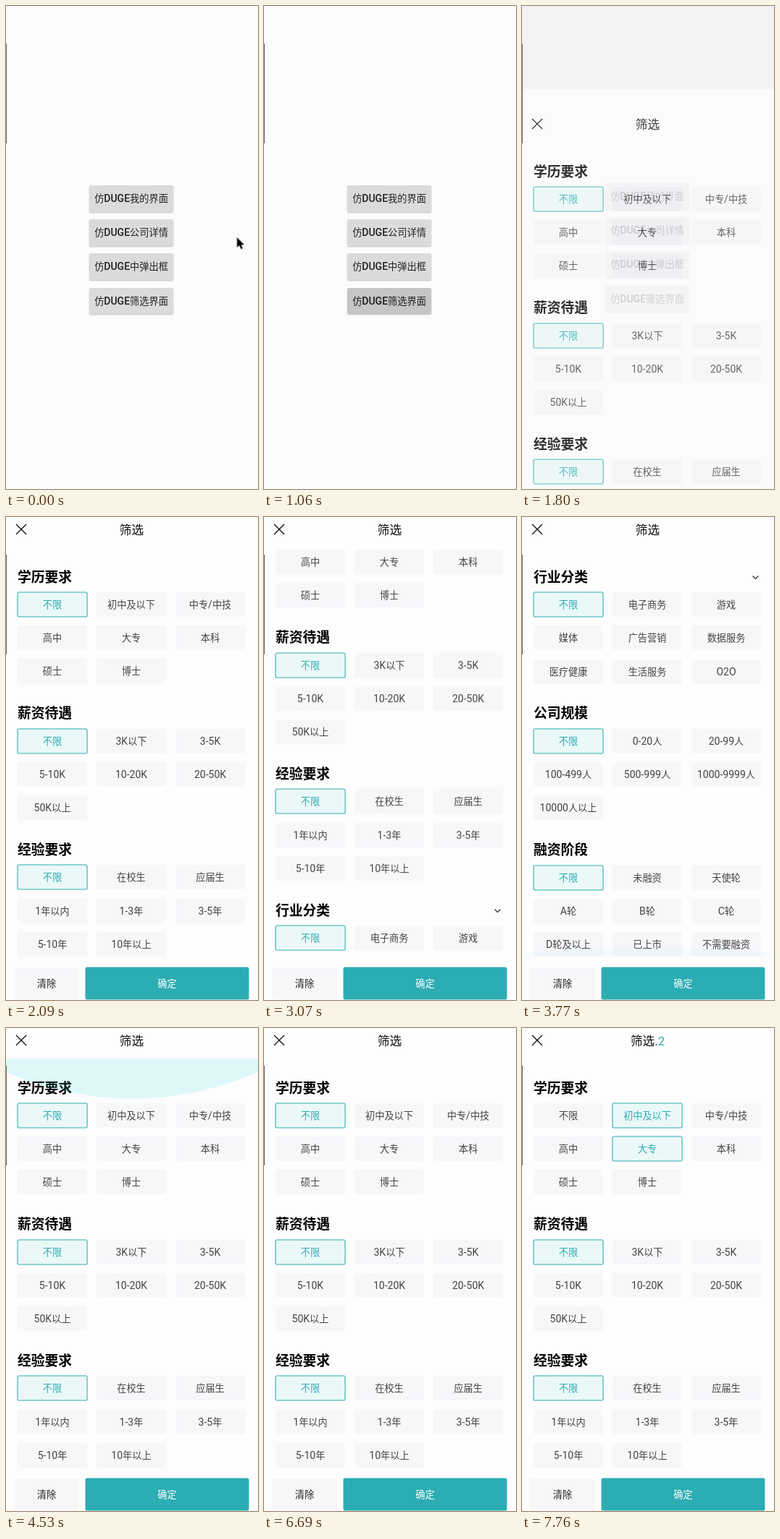
Recreate the animation shown at these times as an HTML page. Size 348 by 668 pixels, loop 8000 ms.

```html
<!DOCTYPE html>
<html lang="zh-CN">
<head>
<meta charset="utf-8">
<title>筛选</title>
<style>
:root { --teal: #2cadb3; --chip: #f7f6f9; --page: #fdfdfd; }
* { box-sizing: border-box; }
html, body { margin: 0; width: 100%; height: 100%; overflow: hidden; background: #fdfbfe; }
body { position: relative; font: 13.2px Roboto, "Noto Sans CJK SC", "Noto Sans CJK", sans-serif; color: #444; white-space: nowrap; }
div, svg, .on { position: absolute; }
.lat { font-size: 14px; }
.stage { inset: 0; width: 348px; height: 668px; overflow: hidden; }
.stage *, .ripple::after { animation: 8s linear infinite; }

/* Start page */
.home, .scrim { inset: 0; }
.home { animation-name: homeUp; }
.btn { left: 115px; width: 116px; height: 36.5px; line-height: 37px; border-radius: 2px; overflow: hidden;
  text-align: center; color: #222; background: #dbdadc; }
.shade { left: 115px; width: 116px; height: 36.5px; border-radius: 2px; box-shadow: 0 1px 2px rgba(0,0,0,.25); }
.btn .lat { font-weight: 500; }
.ripple::after { content: ""; position: absolute; left: -12px; top: -52px; width: 140px; height: 140px; border-radius: 50%;
  background: #000; opacity: 0; animation-name: ripple; }
.scrim { background: #000; opacity: 0; animation-name: scrim; }
.cursor { left: 0; top: 0; overflow: visible; animation-name: cursor; }

/* Filter page */
.sheet { left: 0; top: -31px; width: 348px; height: 699px; border-top: 31px solid var(--page); background: var(--page); animation-name: sheet; }
.title { left: 0; top: 6px; width: 347px; line-height: 25px; font-size: 16.7px; text-align: center; color: #111; }
.title b { font-weight: 400; color: var(--teal); }
.view { left: 0; top: 42px; width: 348px; height: 566px; overflow: hidden; }
.list { left: 0; top: 0; width: 348px; animation-name: scroll; }
.head { left: 16px; line-height: 24px; font-size: 18.8px; font-weight: 700; color: #000; }
.cell { width: 96px; height: 34px; line-height: 34px; text-align: center; border-radius: 2px; background: var(--chip); }
/* Keeps one baseline for lines with and without Latin text */
.cell::before, .on::before, .act::before { content: "\200b"; font-size: 14px; }
.on { inset: 0; border-radius: 2px; background: #ebf8f8; color: var(--teal);
  box-shadow: 0 0 0 .6px var(--teal), inset 0 0 0 .5px var(--teal); }
.step { animation-timing-function: step-end !important; }
.glow { left: 0; width: 348px; height: 56px; overflow: hidden; opacity: 0; }
.glow::before { content: ""; position: absolute; left: -253px; width: 854px; height: 854px; border-radius: 50%; background: rgba(22,214,230,.13); }
.glow.up { top: 0; transform-origin: top; animation-name: glowUp; }
.glow.up::before { bottom: 0; }
.glow.down { bottom: 0; transform-origin: bottom; animation-name: glowDown; }
.glow.down::before { top: 0; }
.act { line-height: 44px; height: 44px; top: 623px; text-align: center; border-radius: 2px; }
.clear { left: 11px; width: 90px; background: var(--chip); color: #222; }
.ok { left: 110px; width: 225px; background: var(--teal); color: #fff; box-shadow: 0 0 0 .5px var(--teal); }
.edge { left: 0; top: 52px; width: 1px; height: 138px; background: #666; }

@keyframes cursor {
  0%, .75% { transform: translate(318.5px, 319.5px); animation-timing-function: ease-in-out; }
  8.125%, 100% { transform: translate(-16px, 570px); }
}
@keyframes ripple {
  0%, 10.3% { transform: scale(0); opacity: .1; }
  13.2% { transform: scale(1); opacity: .1; }
  17.25%, 100% { transform: scale(1); opacity: 0; }
}
@keyframes homeUp {
  0%, 22.2% { transform: none; }
  22.5% { transform: translateY(-3px); }
  26.125%, 100% { transform: translateY(-13px); }
}
@keyframes scrim {
  0%, 22.49% { opacity: 0; }
  22.5% { opacity: .035; }
  26.125%, 100% { opacity: .1; }
}
@keyframes sheet {
  0%, 22.49% { opacity: 0; transform: translateY(148px); }
  22.5% { opacity: .8; transform: translateY(148px); animation-timing-function: cubic-bezier(.15,.6,.3,1); }
  26.125%, 100% { opacity: 1; transform: none; }
}
@keyframes scroll {
  0%, 35.625% { transform: none; }
  36.375% { transform: translateY(-12px); }
  38.375% { transform: translateY(-104px); }
  40% { transform: translateY(-225px); }
  41.875% { transform: translateY(-390px); }
  44.125%, 52.25% { transform: translateY(-566px); }
  53% { transform: translateY(-530px); }
  53.75% { transform: translateY(-400px); }
  55.875%, 100% { transform: none; }
}
@keyframes glowDown {
  0%, 44% { opacity: 0; transform: scaleY(0); }
  45% { opacity: .9; transform: scaleY(.8); }
  47.125%, 52.9% { opacity: .3; transform: scaleY(.23); }
  53%, 100% { opacity: 0; transform: scaleY(0); }
}
@keyframes glowUp {
  0%, 55.8% { opacity: 0; transform: scaleY(0); }
  56.625% { opacity: 1; transform: none; }
  59.625%, 100% { opacity: 0; transform: scaleY(.1); }
}
/* Selections, as visibility over time */
@keyframes any { 0% { opacity: 1 } 66.125% { opacity: 0 } 83.625% { opacity: 1 } 90.25%, 100% { opacity: 0 } }
@keyframes junior { 0% { opacity: 0 } 66.125% { opacity: 1 } 83.625% { opacity: 0 } 90.25%, 100% { opacity: 1 } }
@keyframes college { 0% { opacity: 0 } 72.875% { opacity: 1 } 83.625% { opacity: 0 } 97%, 100% { opacity: 1 } }
@keyframes doctor { 0% { opacity: 0 } 76.875% { opacity: 1 } 83.625%, 100% { opacity: 0 } }
@keyframes one { 0% { opacity: 0 } 66.125% { opacity: 1 } 72.875% { opacity: 0 } 90.25% { opacity: 1 } 97%, 100% { opacity: 0 } }
@keyframes two { 0% { opacity: 0 } 72.875% { opacity: 1 } 76.875% { opacity: 0 } 97%, 100% { opacity: 1 } }
</style>
</head>
<body>
<div class="stage">
  <div class="home" id="home"></div>
  <svg class="cursor" width="12" height="18">
    <path d="M.5 .5V14.5L3.8 11.5 6 16.8 8.4 15.8 6.2 10.7H10.6Z" fill="#000" stroke="#fff" stroke-width="1" paint-order="stroke"/>
  </svg>
  <div class="scrim"></div>
  <div class="sheet">
    <svg width="40" height="34" style="left:0;top:0"><path d="M14 10L28 24M28 10L14 24" stroke="#111" stroke-width="1.4"/></svg>
    <div class="title step" style="animation-name:any">筛选</div>
    <div class="title step" style="animation-name:one">筛选.<b>1</b></div>
    <div class="title step" style="animation-name:two">筛选.<b>2</b></div>
    <div class="title step" style="animation-name:doctor">筛选.<b>3</b></div>
    <div class="view">
      <div class="list" id="list"></div>
      <div class="glow up"></div>
      <div class="glow down"></div>
    </div>
    <div class="act clear">清除</div>
    <div class="act ok">确定</div>
  </div>
  <div class="edge"></div>
</div>
<script>
const buttons = ['我的界面', '公司详情', '中弹出框', '筛选界面'];
const sections = [
  '学历要求 不限 初中及以下 中专/中技 高中 大专 本科 硕士 博士',
  '薪资待遇 不限 3K以下 3-5K 5-10K 10-20K 20-50K 50K以上',
  '经验要求 不限 在校生 应届生 1年以内 1-3年 3-5年 5-10年 10年以上',
  '行业分类 不限 电子商务 游戏 媒体 广告营销 数据服务 医疗健康 生活服务 O2O',
  '公司规模 不限 0-20人 20-99人 100-499人 500-999人 1000-9999人 10000人以上',
  '融资阶段 不限 未融资 天使轮 A轮 B轮 C轮 D轮及以上 已上市 不需要融资'
];
const toggles = { 0: 'any', 1: 'junior', 4: 'college', 7: 'doctor' };

const latin = s => s.replace(/[A-Za-z0-9\/-]+/g, '<span class="lat">$&</span>');

home.innerHTML = buttons.map((name, i) => {
  const top = `style="top:${248 + i * 47.2}px"`;
  return `<div class="shade" ${top}></div><div class="btn${i === 3 ? ' ripple' : ''}" ${top}>${latin('仿DUGE' + name)}</div>`;
}).join('');

function cell(text, i, section) {
  const x = 16 + i % 3 * 109, y = section * 188.7 + 62 + Math.floor(i / 3) * 46.2;
  const anim = section === 0 && toggles[i];
  const on = anim || i === 0
    ? `<span class="on step" style="animation-name:${anim || 'none'}">${latin(text)}</span>` : '';
  return `<div class="cell" style="left:${x}px;top:${y}px">${latin(text)}${on}</div>`;
}

list.innerHTML = sections.map((line, s) => {
  const [head, ...items] = line.split(' ');
  return `<div class="head" style="top:${s * 188.7 + 29.5}px">${head}</div>` + items.map((t, i) => cell(t, i, s)).join('');
}).join('') +
  '<svg width="12" height="8" style="left:317px;top:604px"><path d="M1.5 1.5L5.5 5.5 9.5 1.5" fill="none" stroke="#222" stroke-width="1.1"/></svg>';
</script>
</body>
</html>
```
